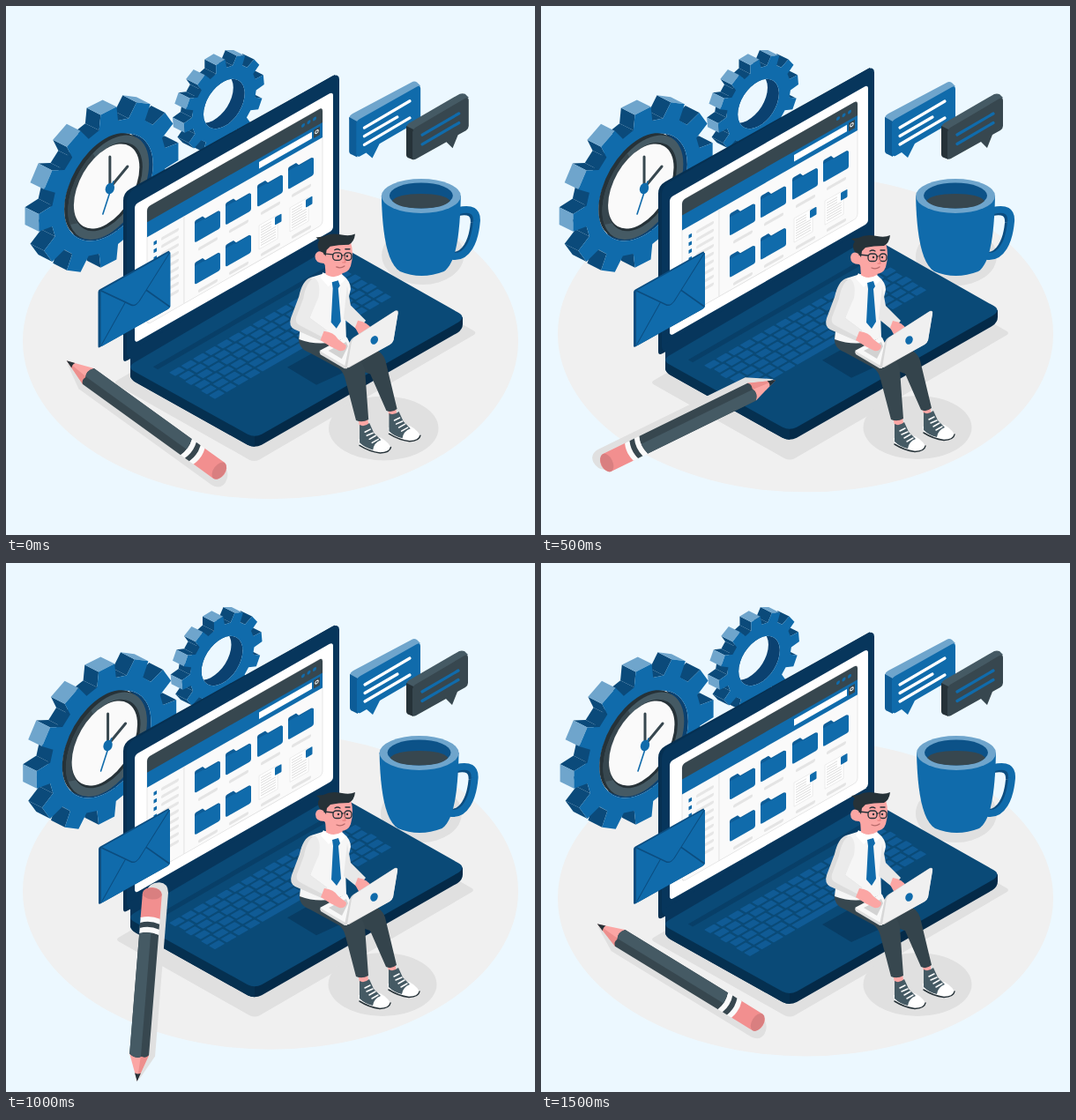
An HTML page that plays this animation: 600 by 600 pixels, repeating every 1540 ms.

```html
<!DOCTYPE html>
<html lang="en">
<head>
<meta charset="utf-8">
<title>Workspace</title>
<style>
  html, body { margin: 0; width: 100%; height: 100%; overflow: hidden; background: #ecf8ff; }
  svg { display: block; width: 100vw; height: 100vh; }
  .blue { fill: #106bab; } .pale { fill: #6fa5cc; } .navy { fill: #0a4a77; } .deep { fill: #07365c; }
  .slate { fill: #37474f; } .steel { fill: #455a64; } .ink { fill: #263238; }
  .skin { fill: #fba6a4; } .shade { fill: #e0e0e0; } .white { fill: #fafafa; }
  .line { fill: none; stroke-linecap: round; stroke-linejoin: round; }
</style>
</head>
<body>
<svg viewBox="0 0 600 600">
  <g class="float"><ellipse cx="300" cy="380" rx="281" ry="179.5" fill="#f0f0f0"/></g>

  <g class="beat shade" data-c="322,398">
    <path d="M129 424L374 281L527 368Q533 371 527 374L288 513Q282 516 276 513L129 430Q123 427 129 424Z"/>
    <ellipse cx="427" cy="478" rx="61.5" ry="36"/>
    <ellipse cx="471" cy="284" rx="46" ry="33"/>
  </g>

  <g class="shake">
    <g id="gears"></g>
    <g transform="matrix(.866 -.5 0 1 116 205)">
      <circle cx="-4" cy="-3" r="53.5" class="ink"/>
      <circle cx=".5" cy="1" r="53" class="steel"/>
      <path class="slate" d="M-50 18A53 53 0 0 1 -20 -48L-14 -36A44 44 0 0 0 -38 22Z"/>
      <circle r="45" class="ink"/>
      <circle cx="-2" cy="-1.5" r="43" class="white"/>
    </g>
    <g class="line" stroke="#37474f" stroke-width="3">
      <path d="M118 205V171M119 205L138 182"/>
      <path d="M122 199L110 236" stroke="#106bab" stroke-width="1.6"/>
    </g>
    <ellipse cx="118" cy="207" rx="5" ry="6.5" class="blue" transform="rotate(20 118 207)"/>
  </g>

  <g class="shake">
    <path class="line" stroke="#0b4d80" stroke-width="8" d="M513 234Q532 230 531 246C529 268 520 284 506 283"/>
    <path class="line" stroke="#106bab" stroke-width="8" d="M514 232Q535 227 534 244C532 268 523 285 508 284"/>
    <path class="blue" d="M426 215C427 262 433 292 447 301Q471 311 497 301C510 292 515 262 516 215Z"/>
    <ellipse cx="471" cy="215.5" rx="45" ry="19.5" class="pale"/>
    <ellipse cx="471" cy="215" rx="36" ry="14.5" fill="#0c5288"/>
    <path class="slate" d="M438 221Q444 213 471 213T504 221Q496 229.5 471 229.5T438 221Z"/>
  </g>

  <g class="float">
    <g transform="matrix(1 -.57 0 1 133 212)">
      <path fill="#063052" d="M0 9Q0 0 8 0L240 3V193H5Q0 193 0 188Z"/>
      <rect x="4" y="3" width="241" height="190" rx="8" class="deep"/>
      <rect x="13" y="21" width="225" height="157" rx="4" fill="#fff"/>
      <g id="page"></g>
    </g>
    <path class="deep" d="M141 414L378 278V255L141 391Z"/>
    <path fill="#042a48" d="M141 410V420Q142 424 147 427L274 498Q282 502 290 498L512 371Q518 367 518 361V353L282 470Z"/>
    <path fill="#053050" d="M141 410V420Q142 424 147 427L274 498Q278 500 282 500V480Z"/>
    <path class="navy" d="M145 405L375 270L513 348Q522 353 513 359L290 486Q282 490 274 486L146 415Q137 410 145 405Z"/>
    <path fill="#083c63" d="M319 410L362 386L400 408L352 430Z"/>
    <g id="keys" transform="matrix(.866 -.5 .866 .5 185 416)" fill="#105b95"></g>
  </g>

  <g class="beat" data-c="146,333">
    <g transform="matrix(1 -.56 0 1 106 324)">
      <rect x="-1" y="-2" width="80" height="65" rx="2" fill="#0b4d80"/>
      <rect x="2" width="78" height="63" rx="2" class="blue"/>
      <path class="line" stroke="#0b4d80" stroke-width="1.3" d="M3 1L36 35Q42 41 48 33L79 1M3 61L29 29M79 61L53 28"/>
    </g>
  </g>

  <g class="beat" data-c="457,130">
    <path class="pale" d="M390 128Q390 124 394 122L460 87Q463 85 466 87L470 91L398 134Z"/>
    <path fill="#0d5c97" d="M390 126L399 131V171L393 168Q390 167 390 164Z"/>
    <path class="blue" d="M398 134Q398 130 402 128L466 92Q470 90 470 94V126Q470 129 467 131L424 156L416 172L409 166L402 170Q398 171 398 167Z"/>
    <path class="line" stroke="#fff" stroke-width="3.2" d="M407 138L458 108M407 147.5L444 126M407 157L458 127"/>
    <path class="steel" d="M454 138Q454 135 457 133L514 100Q517 99 520 100L524 104L461 142Z"/>
    <path class="ink" d="M454 136L462 140V174L457 172Q454 171 454 168Z"/>
    <path class="slate" d="M461 143Q461 140 464 138L520 105Q524 103 524 107V136Q524 139 521 141L512 146L506 161L499 154L465 173Q461 175 461 171Z"/>
    <path class="line" stroke="#106bab" stroke-width="3.2" d="M472 146L513 122M472 156.5L513 132.5"/>
  </g>

  <g class="beat" data-c="396,382">
    <path class="skin" d="M431 452L441 451L443 465L435 466ZM398 463L409 462L412 478L402 479Z"/>
    <g id="shoe">
      <path fill="#fff" d="M400 490L401 497Q412 504 424 506Q435 505 436 499Q430 489 420 487Z"/>
      <path class="steel" d="M401 474Q406 477 412 472L417 483L425 491Q417 494 416 502Q407 500 401 494Z"/>
      <path class="line" stroke="#fff" stroke-width="1.5" d="M407 482L413 479M409 486L416 483M412 490L419 486M415 494L422 490"/>
      <path class="line" stroke="#263238" stroke-width="1.5" d="M401 497Q412 504 424 505.5Q435 505 436 499"/>
    </g>
    <use href="#shoe" x="33" y="-13"/>
    <path fill="#34444c" d="M370 376L410 386Q426 390 430 402L443 456Q437 461 431 458L413 417L365 400Z"/>
    <path class="slate" d="M333 374Q331 388 345 393L378 411Q383 415 385 423L397 469Q404 472 411 468L407 413Q405 402 396 398L380 374Z"/>
    <path fill="#f6f6f6" d="M346 309L362 304L382 306Q391 313 391 322L385 347L386 376Q360 388 333 378L337 340Z"/>
    <path fill="#e8e8e8" d="M387 318L391 340L408 357L399 368L383 355Z"/>
    <path class="skin" d="M399 357Q410 359 414 366L401 374L396 365Z"/>
    <path class="skin" d="M362 292L383 296L381 308Q373 315 363 306Z"/>
    <path fill="#fff" d="M360 303Q370 312 381 305L385 311L379 317L374 312L366 319L357 309Z"/>
    <path class="blue" d="M370 314L377 312L379 318L377 321L380 358L375 366L369 359L371 321Z"/>
    <path fill="#dcdcdc" d="M346 309Q337 312 333 330L324 354Q321 363 328 367L358 380L364 368L345 354L354 330Q357 314 346 309Z"/>
    <path fill="#ebebeb" d="M350 309Q341 314 338 332L330 353Q328 360 335 363L360 376L364 368L345 354L355 331Q358 314 350 309Z"/>
    <path fill="#dedede" d="M356 392L387 376L391 386L387 411L384 411L357 395Z"/>
    <path fill="#f8f8f8" d="M356 391L386 375L391 384L385 408Z"/>
    <path fill="#d2d2d2" d="M366 391L386 381L388 386L381 400Z"/>
    <path class="skin" d="M361 369Q372 370 377 378L386 385Q386 392 378 391L368 386L357 379Z"/>
    <path fill="#d8d8d8" d="M384 410L390 381Q391 378 394 376L441 346Q445 345 444 349L439 379Q438 382 435 384L389 410Z"/>
    <path fill="#f0f0f0" d="M387 410L392 381Q393 378 395 376L440 347Q444 345 444 349L439 379Q438 382 435 384Z"/>
    <ellipse cx="417.5" cy="379" rx="4" ry="5" class="blue" transform="rotate(28 417.5 379)"/>
    <path class="skin" d="M360 273L391 269Q395 282 391 296Q388 305 377 304Q366 302 361 293Q351 293 351 285Q352 278 360 280Z"/>
    <path class="ink" d="M356 279Q352 272 356 267L352 264L360 263Q369 258 381 261Q390 263 396 260Q395 269 389 272Q377 272 368 274L364 278L363 285L360 281Z"/>
    <g class="line" stroke="#263238" stroke-width="1.3">
      <rect x="371" y="281" width="10" height="8.5" rx="3.5"/><rect x="384" y="281" width="8" height="8.5" rx="3.5"/>
      <path d="M371 283L361 282M381 284H384M373 278Q376 276 379 278M385 277L390 277"/>
      <path d="M375 297Q380 299 384 296" stroke="#b86b6b"/>
      <path d="M383 284L385 292L382 292" stroke="#e98482"/>
    </g>
    <circle cx="377" cy="285" r="1.2" class="ink"/><circle cx="387" cy="285" r="1.2" class="ink"/>
  </g>

  <g id="pencil">
    <path class="shade" d="M114 1L86 -15L-100 -15Q-111 -14 -111 -4Q-110 8 -99 10Z"/>
    <g transform="translate(1.5 3)">
      <path class="skin" d="M114 0L84 -11V11Z"/>
      <path fill="#ed8f8d" d="M114 0L84 -11V-2Z"/>
      <path class="ink" d="M114.5 0L105 -3.4Q107 0 105 3.4Z"/>
      <path class="slate" d="M-53 -11H84Q88 -8 86 -3Q90 4 84 11H-53Q-57 0 -53 -11Z"/>
      <path class="steel" d="M-55 -2H86Q90 4 84 11H-53Z"/>
      <path fill="#f28f8f" d="M-70 -11H-98Q-106 -9 -106 0T-98 11H-70Z"/>
      <ellipse cx="-99" rx="6.5" ry="11" fill="#d97f80"/>
      <path class="white" d="M-53 -11H-71Q-75 0 -71 11H-53Q-57 0 -53 -11Z"/>
      <path class="slate" d="M-59 -11H-65Q-69 0 -65 11H-59Q-63 0 -59 -11Z"/>
    </g>
  </g>
</svg>
<script>
const $ = id => document.getElementById(id);
const all = sel => [...document.querySelectorAll(sel)];
const rect = (x, y, w, h, attrs = '') => `<rect x="${x}" y="${y}" width="${w}" height="${h}" ${attrs}/>`;
const times = (n, fn) => Array.from({ length: n }, (_, i) => fn(i)).join('');

// Isometric gear: side walls first, then the front face with its hole.
function gear({ x, y, tip, root, hole, turn, depth: [du, dv] }) {
  const pts = [];
  for (let i = 0; i < 12; i++) {
    for (const [r, off] of [[root, -9.5], [tip, -6.5], [tip, 6.5], [root, 9.5]]) {
      const a = (turn + i * 30 + off) * Math.PI / 180;
      pts.push([r * Math.cos(a), r * Math.sin(a)]);
    }
  }
  const poly = p => 'M' + p.map(q => q.map(n => n.toFixed(1)).join(' ')).join('L') + 'Z';
  const circle = (u, v) => `M${u - hole} ${v}a${hole} ${hole} 0 1 0 ${2 * hole} 0a${hole} ${hole} 0 1 0 ${-2 * hole} 0Z`;
  const walls = [[], []];
  pts.forEach((a, i) => {
    const b = pts[(i + 1) % pts.length];
    const nu = b[1] - a[1], nv = a[0] - b[0];
    if (nu * du + nv * dv <= 0) return;
    const lit = i % 4 === 1 && nv < 6;
    const quad = poly([a, b, [b[0] + du, b[1] + dv], [a[0] + du, a[1] + dv]]);
    walls[+lit].push(`<path fill="${lit ? '#6fa5cc' : '#0b4a7a'}" d="${quad}"/>`);
  });
  return `<g transform="matrix(.9 -.46 0 .985 ${x} ${y})">
    <path fill="#0b4170" fill-rule="evenodd" d="${circle(0, 0)}${circle(du, dv)}"/>
    ${walls.flat().join('')}
    <path class="blue" fill-rule="evenodd" d="${poly(pts)}${circle(0, 0)}"/></g>`;
}

$('gears').innerHTML =
  gear({ x: 247.5, y: 111, tip: 50.5, root: 40.5, hole: 26, turn: -5, depth: [-14.4, -13.3] }) +
  gear({ x: 116.5, y: 205.5, tip: 88.5, root: 72, hole: 56, turn: 0, depth: [-17.5, -16.2] });

$('keys').innerHTML =
  rect(-4, -17, 244, 6, 'fill="#083f68"') +
  times(6, r => r === 5
    ? times(4, i => rect(i * 15.6, 52, 13, 8, 'rx="1"')) + rect(62.4, 52, 76, 8, 'rx="1"') +
      times(6, i => rect(140.4 + i * 15.6, 52, 13, 8, 'rx="1"'))
    : times(15, i => rect(i * 15.6 + (r % 2) * 2, r * 10.4, 13, 8, 'rx="1"')));

const folder = (x, y) => `<g transform="translate(${x} ${y})">
  <path fill="#0d5c97" d="M0 2Q0 0 2 0H9L12 4H26Q28 4 28 6V22H0Z"/>
  <path class="blue" d="M0 4H9L12 5H27Q29 5 29 7V23Q29 25 27 25H2Q0 25 0 23Z"/>
  ${rect(4, 33, 22, 3.5, 'rx="1.5" fill="#e4e4e4"')}</g>`;
const sheet = (x, y) => `<g transform="translate(${x} ${y})">
  ${rect(2, 1, 21, 27, 'fill="#fff" stroke="#e8e8e8" stroke-width=".7"')}
  ${times(8, i => rect(4, 4 + i * 2.9, i < 3 ? 12 : 17, 1, 'fill="#dcdcdc"'))}
  ${rect(20, 2, 7.5, 9, 'rx="1" class="blue"')}
  ${rect(4, 34, 22, 3.5, 'rx="1.5" fill="#e4e4e4"')}</g>`;
const cols = [81, 116, 152, 187];

$('page').innerHTML =
  rect(27, 32, 199, 133, 'rx="4" fill="#fafafa" stroke="#e0e0e0" stroke-width=".8"') +
  '<path class="blue" d="M27 46H226V66H27Z"/><path class="slate" d="M27 49V36Q27 32 31 32H222Q226 32 226 36V49Z"/>' +
  times(3, i => `<circle cx="${204 + i * 6.5}" cy="40" r="2" class="blue"/>`) +
  rect(154, 53, 60, 7.5, 'fill="#fff"') + rect(216, 52, 7, 9.5, 'class="slate"') +
  '<circle cx="219.5" cy="56" r="1.7" fill="none" stroke="#fff"/>' +
  rect(68.5, 66, .9, 99, 'fill="#e0e0e0"') +
  times(9, i => rect(34.5, 75.5 + i * 8.7, 3.5, 4, 'class="blue"') +
    rect(43, 75.5 + i * 8.7, 20, 3.5, 'rx="1.5" fill="#e6e6e6"')) +
  cols.map(x => folder(x, 78)).join('') +
  cols.slice(0, 2).map(x => folder(x, 125.5)).join('') +
  cols.slice(2).map(x => sheet(x, 124)).join('');

// Linear interpolation in a table of [position, value].
function along(table, x) {
  let i = 1;
  while (i < table.length - 1 && x > table[i][0]) i++;
  const [x0, y0] = table[i - 1], [x1, y1] = table[i];
  return y0 + (y1 - y0) * (x - x0) / (x1 - x0);
}

const LOOP = 1540, CYCLE = 1500, STEP = 1000 / 24;
const CLOCK = [[0, 18], [5, 215], [12, 510], [19, 798], [24, 1013], [28, 1198], [36, 1500]];
const BEAT = [[0, 1], [.1, 1.1], [.3, 1], [.4, 1], [.5, 1.1], [.6, 1], [1, 1]];
const SHAKE = [0, -1, 2, -4, 4, -4, 4, -4, 2, -1, 0].map((v, i) => [i / 10, v * 1.2]);
const floats = all('.float'), shakes = all('.shake'), beats = all('.beat');
const move = (el, value) => el.setAttribute('transform', value);

function draw(ms) {
  const step = Math.min(36, Math.floor((ms % LOOP + 5) / STEP));
  const p = along(CLOCK, step) / CYCLE;
  const lift = -12 * (1 - Math.abs(1 - 2 * p));
  const shift = along(SHAKE, p), size = along(BEAT, p);
  floats.forEach(el => move(el, `translate(0 ${lift})`));
  shakes.forEach(el => move(el, `translate(${shift} 0)`));
  beats.forEach(el => {
    const [x, y] = el.dataset.c.split(',');
    move(el, `translate(${x} ${y}) scale(${size}) translate(${-x} ${-y})`);
  });
  move($('pencil'), `translate(161 472.5) rotate(${211.5 + 360 * p})`);
}

const start = performance.now();
function tick() {
  draw(performance.now() - start);
  requestAnimationFrame(tick);
}
tick();
</script>
</body>
</html>
```
